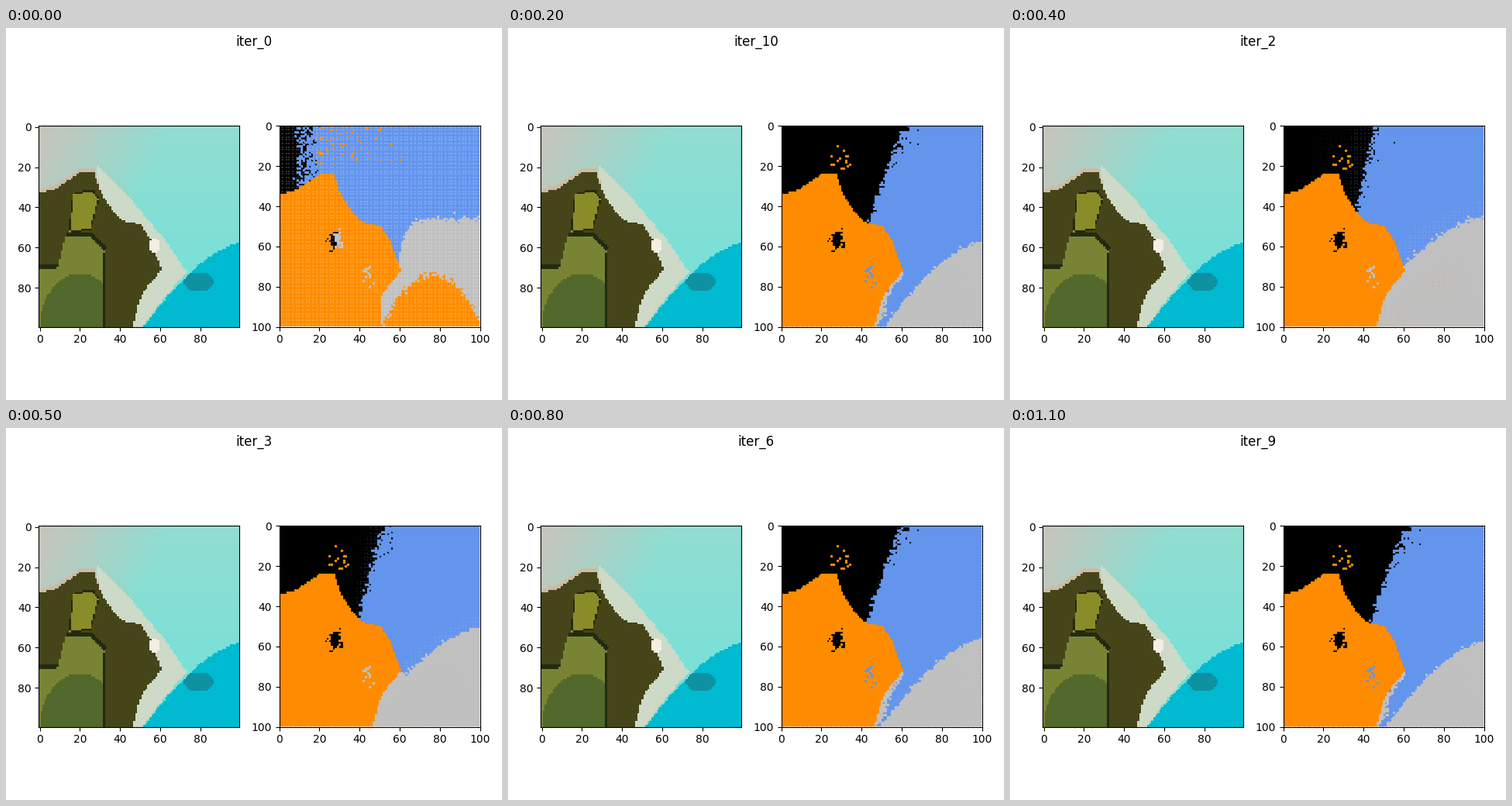
Write a matplotlib script that moves like this. It is 640x480 px and loops after 1200 ms.

```python
import numpy as np
import matplotlib.pyplot as plt
from matplotlib.animation import FuncAnimation
from matplotlib.path import Path

N = 100
ITERS = 12
W, H = 640, 480
COLORS = ["black", "darkorange", "cornflowerblue", "silver"]
BLACK, ORANGE, BLUE, SILVER = range(4)

Y, X = np.mgrid[0:N, 0:N]
rng = np.random.default_rng(7)
tail_a, tail_b = rng.exponential(size=(2, N, N))
wobble = rng.normal(size=(N, N))
chance = rng.random((N, N))
row_shift = rng.normal(0, 0.8, (N, 1))


def inside(pts):
    grid = np.column_stack([X.ravel(), Y.ravel()])
    return Path(pts).contains_points(grid).reshape(N, N)


def box(x0, y0, x1, y1):
    return (X >= x0) & (X <= x1) & (Y >= y0) & (Y <= y1)


def bump(x, y, rx, ry):
    return np.exp(-((X - x) / rx) ** 2 - ((Y - y) / ry) ** 2)


def settle(start, end, n):
    """Value that equals start at n = 1 and eases towards end."""
    return end + (start - end) * 0.6 ** (n - 1)


COAST = np.array([(-1, 34), (8, 32), (20, 24), (27, 23.5), (31, 35), (37, 44),
                  (42, 48), (50, 49.5), (55, 57), (60.5, 72), (53, 81),
                  (50, 86), (46, 101), (-1, 101)])
LAND = inside(COAST)


def sea_line(n):
    """Row where the silver cluster begins, for every column."""
    if n == 0:
        return 47 + 17 * np.exp((60 - X) / 3)
    left, right = settle(57, 89, n), settle(38, 58, n)
    return right + (left - right) * ((N - X) / 40) ** 1.6


# ---- aerial view: soft water gradient with flat areas

def aerial():
    u, v = X[..., None] / N, Y[..., None] / N
    fade = np.clip(1.1 - 1.7 * u - 0.7 * v, 0, 1)
    water = np.array([146, 221, 209]) * (1 - v) + np.array([112, 226, 218]) * v
    img = water * (1 - fade) + np.array([196, 198, 188]) * fade

    beach = [(28, 19), (46, 37), (62, 56), (73, 72), (60, 87), (50, 101),
             (30, 101)]
    field = np.array([(17, 34), (26, 32), (29, 36), (25, 50), (15, 52)])
    meadow = np.array([(13, 54), (25, 54), (32, 62), (31, 101), (-1, 101),
                       (-1, 71), (9, 70)])
    rim = 1.12 * (field - field.mean(0)) + field.mean(0)

    img[Y > sea_line(9)] = (0, 186, 209)
    img[bump(79, 77, 8, 5) > 0.4] = (14, 146, 162)
    img[inside(beach)] = (205, 218, 200)
    img[inside(COAST - (0, 3)) & (X < 30)] = (204, 186, 165)
    img[inside(COAST - (0, 1))] = (70, 69, 25)
    img[inside(rim) | inside(meadow + (1, -2))] = (36, 42, 18)
    img[inside(field)] = (138, 140, 42)
    img[inside(meadow)] = (120, 132, 52)
    img[inside(meadow) & (bump(20, 100, 20, 27) > 0.37)] = (82, 104, 44)
    img[bump(57, 59, 3, 4) > 0.4] = (244, 238, 228)
    return img / 255


# ---- cluster labels

def labels(n):
    lab = np.full((N, N), BLUE)

    rough = settle(0.7, 0.4, n) * (wobble - tail_a)
    shore = 60 - 11 * (np.clip(Y - 72, 0, None) / 20) ** 0.7
    strip = (Y > 72) & (X < shore + settle(10, 1.5, n) + wobble)
    lab[(Y > sea_line(n) + rough) & (X > 46) | strip] = SILVER

    if n == 0:
        lab[(Y < 36) & (chance < (21 - X) / 15)] = BLACK
        lab[box(18, 0, 62, 19) & (chance > 0.8 + X / 350)] = ORANGE
        lab[Y > 74 + 0.04 * (X - 76) ** 2 + 1.5 * wobble] = ORANGE
    else:
        top, foot = settle(34, 62, n), settle(30, 44, n)
        edge = top + (foot - top) * (Y / 46) ** 0.8 + row_shift
        spread = 2.6 * np.clip(1 - Y / 48, 0.15, 1)
        lab[(Y < 50) & (X < edge + spread * (tail_b - 0.3))] = BLACK
        lab[chance < 0.2 * bump(31, 17, 5, 4)] = ORANGE
    if n == 1:
        patches = bump(79, 78, 6, 5) + bump(59, 96, 4, 6)
        lab[chance < 0.6 * patches] = ORANGE

    lab[LAND] = ORANGE
    if n < 2:
        lab[box(40, 86, 50, 99)] = ORANGE
    lab[LAND & (chance < 0.5 * bump(44, 74, 2, 4))] = SILVER if n < 4 else BLUE
    shade = chance < 1.3 * bump(27.5, 56.5, 3, 4)
    lab[shade] = BLACK
    if n == 0:
        lab[shade & (X + wobble > 28)] = SILVER
    return lab


# ---- figure

fig = plt.figure(figsize=(W / 100, H / 100), dpi=100)
title = fig.suptitle("iter_0", y=0.9822)


def panel(left):
    return fig.add_axes([left / W, 94.4 / H, 259.15 / W, 259.15 / H])


photo = panel(42.3)
photo.imshow(aerial(), interpolation="nearest", aspect="auto")
photo.set_xticks(range(0, N, 20))
photo.set_yticks(range(0, N, 20))

chart = panel(352.65)
layers = []
for n in range(ITERS):
    lab = labels(n)
    layers.append([chart.scatter(X[lab == k], Y[lab == k], s=2, color=c)
                   for k, c in enumerate(COLORS)])
chart.set_xlim(0, N)
chart.set_ylim(N, 0)

# runs play in alphabetical order: 0, 1, 10, 11, 2, ...
ORDER = sorted(range(ITERS), key=str)


def update(i):
    n = ORDER[i]
    title.set_text(f"iter_{n}")
    # each iteration is plotted over the earlier ones
    for k, group in enumerate(layers):
        for dots in group:
            dots.set_visible(k <= n)
    return [title]


anim = FuncAnimation(fig, update, frames=ITERS, interval=100, repeat=True,
                     repeat_delay=0, blit=False)
plt.show()
```
